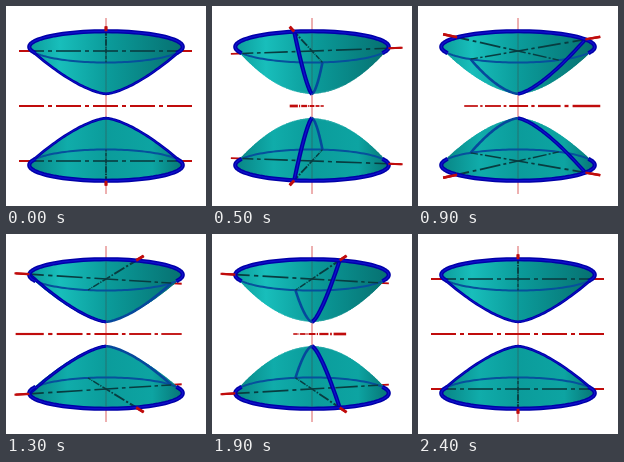
Recreate the animation shown at these times as an HTML page with a canvas. Size 200 by 200 pixels, loop 2.5 s.

```html
<!DOCTYPE html>
<html>
<head>
<meta charset="utf-8">
<style>
html, body { margin: 0; width: 100%; height: 100%; overflow: hidden; background: #fff; }
canvas { display: block; width: 200px; height: 200px; }
</style>
</head>
<body>
<canvas></canvas>
<script>
const canvas = document.querySelector('canvas');
const ratio = window.devicePixelRatio || 1;
canvas.width = canvas.height = 200 * ratio;
const c = canvas.getContext('2d');
c.scale(ratio, ratio);
c.lineJoin = 'round';

// Two bowls, tip to tip, seen from the level of their common centre
const EYE = 280, RIM = 74, HEIGHT = 55, TIP = 12.2, AXIS = 87;
const RED = '#c00c0c', BLUE = '#0000a8', SHINE = '#1010cc';
const TURN = 2 * Math.PI;

const scaleAt = z => EYE / (EYE - z);
const project = (x, y, z) => [100 + x * scaleAt(z), 100 - y * scaleAt(z)];

// Height from 0 (tip) to 1 (rim); sections widen faster across the blue curve
const level = h => TIP + (HEIGHT - TIP) * h;
const along = h => RIM * h ** (1 / 1.5);
const across = h => RIM * h ** (1 / 2);

function trace(points) {
  c.beginPath();
  points.forEach(p => c.lineTo(...p));
}

function stroke(points, color, width) {
  trace(points);
  c.strokeStyle = color;
  c.lineWidth = width;
  c.stroke();
}

function tube(points, width) {
  stroke(points, BLUE, width);
  stroke(points, SHINE, width * 0.3);
}

// Samples f at evenly spaced values from a to b
const sample = (a, b, n, f) =>
  Array.from({ length: n + 1 }, (_, i) => f(a + (b - a) * i / n));

const section = (angle, side, h) => sample(0, TURN, 60, t => {
  const u = along(h) * Math.cos(t), v = across(h) * Math.sin(t);
  const cos = Math.cos(angle), sin = Math.sin(angle);
  return project(u * cos - v * sin, side * level(h), u * sin + v * cos);
});

const rimArc = (from, to, side) => sample(from, to, 60, t =>
  project(RIM * Math.cos(t), side * HEIGHT, RIM * Math.sin(t)));

const meridian = (angle, side) => sample(0, 1, 40, s => {
  const h = s * s, r = along(h);
  return project(r * Math.cos(angle), side * level(h), r * Math.sin(angle));
});

function bar(angle, y, from, to, color, width) {
  const at = t => project(t * Math.cos(angle), y, t * Math.sin(angle));
  const mid = scaleAt((from + to) / 2 * Math.sin(angle));
  stroke([at(from), at(to)], color, width * mid);
}

// Dash-dot line, cut off at the given reach
function dashDot(angle, y, reach, color, width) {
  for (let t = -AXIS; t < AXIS; t += 37) {
    for (const [start, end] of [[t, t + 25], [t + 29, t + 33]]) {
      const a = Math.max(start, -reach), b = Math.min(end, reach);
      if (a < b) bar(angle, y, a, b, color, width);
    }
  }
}

function gradient(...stops) {
  const g = c.createLinearGradient(23, 0, 177, 0);
  stops.forEach(([at, color]) => g.addColorStop(at, color));
  return g;
}
const upperShade = gradient([0, '#0c9c9a'], [0.2, '#18bebb'], [0.5, '#0b9c9b'], [1, '#067070']);
const lowerShade = gradient([0, '#088484'], [0.25, '#10acaa'], [0.5, '#0b9c9b'],
  [0.8, '#0da4a2'], [1, '#067474']);

function sheet(angle, side) {
  const y = side * HEIGHT, cross = angle + Math.PI / 2;
  for (const a of [angle, cross]) dashDot(a, y, AXIS, RED, 2);

  c.fillStyle = side > 0 ? upperShade : lowerShade;
  sample(0, 1, 50, s => {
    trace(section(angle, side, s * s));
    c.fill();
  });

  stroke([[100, 100 - side * 74], [100, 100 - side * TIP]], 'rgba(70,60,60,0.55)', 0.8);
  const halves = [angle, angle + Math.PI];
  const isNear = a => RIM * Math.sin(a) > -1;
  stroke(rimArc(Math.PI, TURN, side), '#06509c', 2);
  halves.filter(a => !isNear(a)).forEach(a => stroke(meridian(a, side), '#06489c', 2.6));
  for (const a of [angle, cross]) dashDot(a, y, RIM, '#083c40', 1.6);

  halves.filter(isNear).forEach(a =>
    tube(meridian(a, side), 2.8 + 1.4 * Math.max(0, Math.sin(a))));
  tube(rimArc(-0.15, Math.PI + 0.15, side), 4.2);
  for (const a of [...halves, cross, cross + Math.PI]) {
    if (Math.sin(a) > 0.01) bar(a, y, RIM, AXIS, RED, 2);
  }
}

function draw(now) {
  const step = Math.floor(now % 2500 / 100);
  const left = (24 - step) % 24;
  const angle = 14.75 * left * Math.PI / 180;
  c.fillStyle = '#fff';
  c.fillRect(0, 0, 200, 200);
  stroke([[100, 12], [100, 188]], '#d85050', 0.9);
  dashDot(angle, 0, AXIS, RED, 2);
  sheet(angle, 1);
  sheet(angle, -1);
}

const begin = performance.now();
function tick() {
  draw(performance.now() - begin);
  requestAnimationFrame(tick);
}
tick();
</script>
</body>
</html>
```
